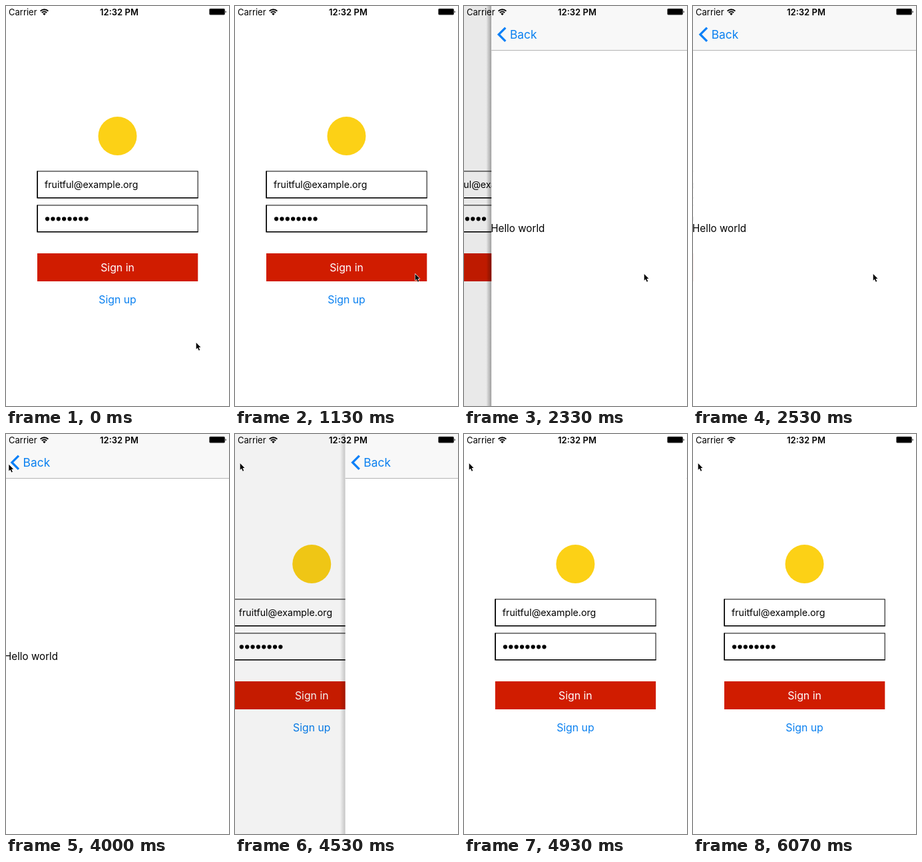
These frames come from a looping animation (335 by 600 pixels, 6140 ms). An HTML page:

```html
<!DOCTYPE html>
<html lang="en">
<head>
<meta charset="utf-8">
<title>Sign in navigation</title>
<style>
  html, body { margin: 0; width: 100%; height: 100%; overflow: hidden; background: #fff; }
  svg { display: block; width: 335px; height: 600px; }
  text { font-family: Inter, Roboto, sans-serif; font-size: 15.8px; white-space: pre; }
  .mid { text-anchor: middle; }
  .link { fill: #0a80f0; }
  .status text { font-size: 13px; }
</style>
</head>
<body>
<svg viewBox="0 0 335 600">
  <defs>
    <linearGradient id="edge">
      <stop offset="0" stop-color="#000" stop-opacity="0"/>
      <stop offset="1" stop-color="#000" stop-opacity=".38"/>
    </linearGradient>
    <g id="field" stroke="#000">
      <rect x="47.2" y="247.9" width="241" height="39.8" fill="#fff"/>
      <path d="M47.2 247.4 V287.7 H288.7" fill="none" stroke-width="1.6"/>
    </g>
  </defs>
  <rect width="335" height="600" fill="#fff"/>

  <g id="home">
    <circle cx="167.5" cy="195" r="29" fill="#fcd116"/>
    <use href="#field"/>
    <use href="#field" y="51"/>
    <text x="58" y="272.5" style="font-size:14.2px">fruitful@example.org</text>
    <g id="dots"></g>
    <rect x="47" y="371" width="241.3" height="42" fill="#d01c00"/>
    <text id="signIn" class="mid" x="167.5" y="397.8" fill="#fff">Sign in</text>
    <text class="mid link" x="167.5" y="445.8">Sign up</text>
  </g>
  <rect id="dim" width="335" height="600"/>

  <g id="page">
    <rect id="shade" x="-10" width="8" height="600" fill="url(#edge)"/>
    <rect x="-2" width="340" height="600" fill="#fff"/>
    <rect x="-2" width="340" height="66" fill="#f8f8f8"/>
    <rect x="-2" y="66" width="340" height="1" fill="#b4b4b4"/>
    <path d="M19 32.6 L8.9 42.7 L19 52.8" fill="none" stroke="#0a80f8" stroke-width="3.3"/>
    <text class="link" x="25.6" y="49" style="font-size:17.4px">Back</text>
    <text id="hello" x="-3" y="339.3" style="font-size:15.2px">Hello world</text>
  </g>

  <g class="status">
    <text x="4" y="13.6">Carrier</text>
    <g fill="none" stroke="#000" stroke-width="2">
      <path d="M51.6 7.6 A8.4 8.4 0 0 1 63.4 7.6"/>
      <path d="M53.9 10 A5.1 5.1 0 0 1 61.1 10"/>
    </g>
    <path d="M57.5 14 L55.3 11.7 A3.1 3.1 0 0 1 59.7 11.7 Z"/>
    <text class="mid" x="170" y="13.6" font-weight="600">12:32 PM</text>
    <rect x="305.2" y="3.8" width="23.8" height="9.8" rx="1.8" fill="#555"/>
    <rect x="306" y="4.6" width="22.2" height="8.2" rx="1"/>
    <path d="M329.6 7 A2 2 0 0 1 329.6 10.6 Z"/>
  </g>

  <path id="cursor" d="M-.3 0 V9.7 L1.9 7.7 L3.7 11.7 L5.2 11 L3.5 7.1 H6.5 Z"
        stroke="#fff" stroke-width="1.2" paint-order="stroke" stroke-linejoin="round"/>
</svg>
<script>
  const LOOP = 6140, STEP = 1000 / 15, TRAVEL = 337, PARALLAX = 104;
  const PUSH = 2136, POP = 4441, RELEASE = 2000;
  const $ = id => document.getElementById(id);

  for (let i = 0; i < 8; i++) {
    const dot = document.createElementNS('http://www.w3.org/2000/svg', 'circle');
    dot.setAttribute('cx', 62.1 + i * 8.36);
    dot.setAttribute('cy', 319.3);
    dot.setAttribute('r', 3.1);
    $('dots').append(dot);
  }

  // start, end, from, to
  const moves = [
    [0, 333, [286, 505], [186, 376]],
    [467, 800, [186, 376], [271, 402]],
    [3200, 3733, [271, 402], [4, 46]],
    [3933, 4200, [4, 46], [8, 44]]
  ];

  const clamp = v => Math.min(1, Math.max(0, v));
  const ease = v => v * v * (3 - 2 * v);
  const place = (id, x, y) => $(id).setAttribute('transform', `translate(${x.toFixed(2)} ${y.toFixed(2)})`);
  const fade = (id, alpha) => $(id).setAttribute('opacity', alpha.toFixed(4));

  // Critically damped spring: share of the way still to go.
  function spring(ms) {
    const u = Math.max(0, ms) * 0.0181;
    return (1 + u) * Math.exp(-u);
  }

  function cursorAt(t) {
    const [start, end, a, b] = moves.filter(m => m[0] <= t).pop();
    const k = ease(clamp((t - start) / (end - start)));
    return a.map((v, i) => v + (b[i] - v) * k);
  }

  function draw(t) {
    const away = t < POP ? spring(t - PUSH) : 1 - spring(t - POP);
    const shown = 1 - away;
    place('page', TRAVEL * away, 0);
    place('home', -PARALLAX * shown, 0);
    fade('dim', 0.1 * shown);
    fade('shade', shown);
    fade('hello', t < POP ? 1 : 0); // the page is emptied as it leaves
    fade('signIn', t < 1930 ? 1 : 0.2 + 0.8 * clamp((t - RELEASE) / 470));
    place('cursor', ...cursorAt(t));
  }

  // The picture changes 15 times a second.
  function tick() {
    const t = performance.now() % LOOP;
    draw(Math.floor((t + 4) / STEP) * STEP);
    requestAnimationFrame(tick);
  }
  tick();
</script>
</body>
</html>
```
